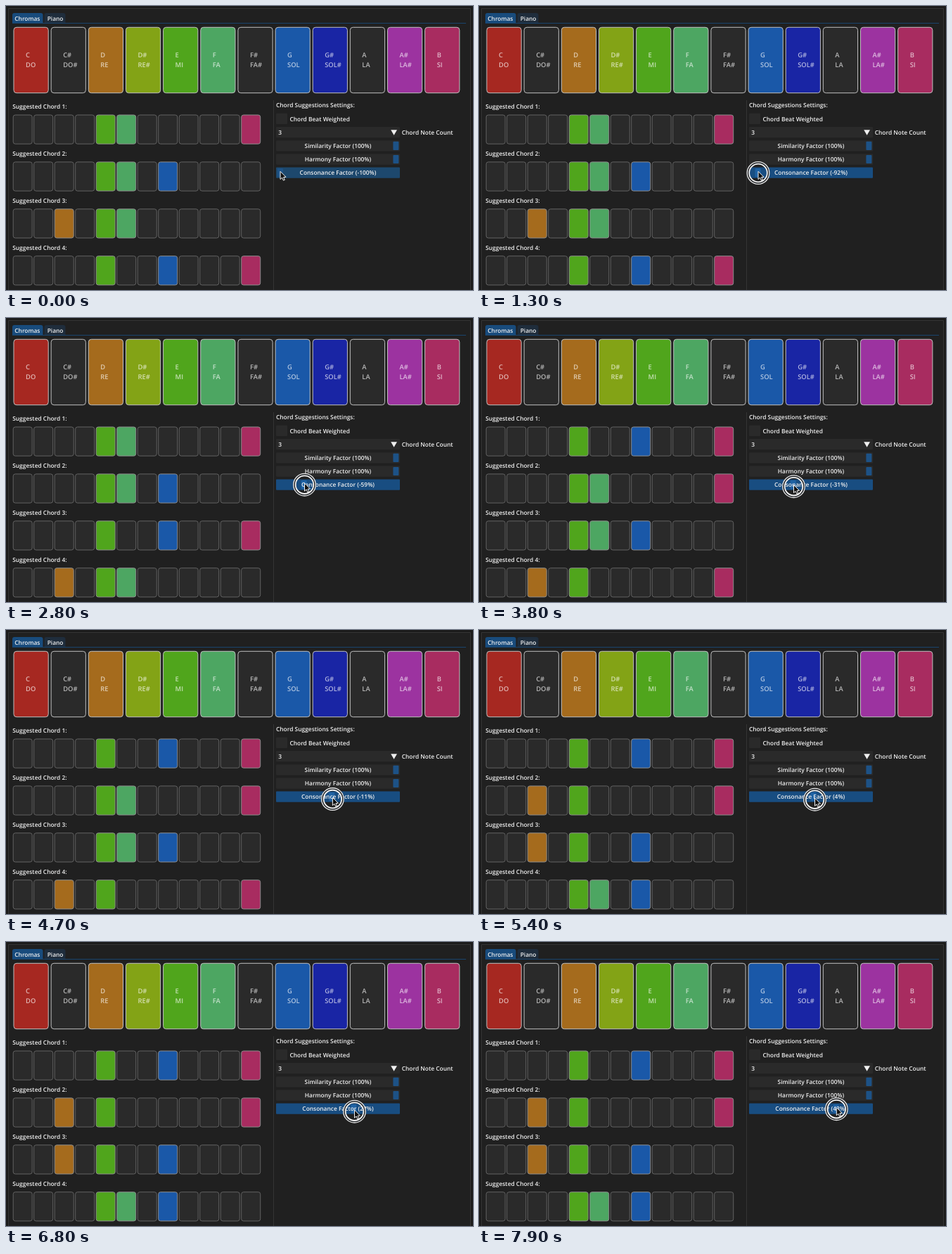
These frames come from a looping animation (664 by 404 pixels, 8000 ms). An HTML page with a canvas:

```html
<!DOCTYPE html>
<html lang="en">
<head>
<meta charset="utf-8">
<title>Chord suggestions</title>
<style>
html, body { margin: 0; width: 100%; height: 100%; overflow: hidden; background: #202020; }
canvas { display: block; width: 664px; height: 404px; }
</style>
</head>
<body>
<canvas id="stage"></canvas>
<script>
const W = 664, H = 404, LOOP = 8000, STEP = 100;
const canvas = document.getElementById('stage');
const ctx = canvas.getContext('2d');
const ratio = window.devicePixelRatio || 1;
canvas.width = W * ratio;
canvas.height = H * ratio;

const DARK = '#2a2a2a', INK = '#f0f0f0';
const FAMILY = '"Open Sans", "Noto Sans", sans-serif';
const NOTES = ['C', 'C#', 'D', 'D#', 'E', 'F', 'F#', 'G', 'G#', 'A', 'A#', 'B'];
const SOLFA = ['DO', 'DO#', 'RE', 'RE#', 'MI', 'FA', 'FA#', 'SOL', 'SOL#', 'LA', 'LA#', 'SI'];
const COLORS = {
  C: '#a62821', D: '#a56b1d', 'D#': '#83a316', E: '#50a51c', F: '#4da662',
  G: '#1a58a8', 'G#': '#1925a4', 'A#': '#9c33a0', B: '#a82c60'
};

// Ranked chords from each moment on
const RANKS = [
  [0, 'EFB EFG DEF EGB'],
  [2000, 'EFB EFG EGB DEF'],
  [3100, 'EFB EGB EFG DEF'],
  [3300, 'EGB EFB EFG DEF'],
  [3500, 'EGB EFB EFG DEB'],
  [5000, 'EGB EFB DEB EFG'],
  [5200, 'EGB DEB DEG EFG']
].map(([at, list]) => ({ at, chords: list.split(' ') }));

// time, pointer x, pointer y, slider value
const PATH = [
  [0, 390, 235.3, -100],
  [400, 390, 235.3, -100],
  [1300, 397, 235.3, -92],
  [2800, 424.5, 235, -59],
  [3800, 447.5, 237.5, -31],
  [5400, 477.5, 239, 4],
  [6800, 495.5, 239, 27],
  [7900, 508.3, 235.5, 43]
];
const PRESS = 200;

function pose(t) {
  let i = 1;
  while (i < PATH.length - 1 && t > PATH[i][0]) i++;
  const a = PATH[i - 1], b = PATH[i];
  const k = Math.min(1, (t - a[0]) / (b[0] - a[0]));
  const [x, y, value] = [1, 2, 3].map(n => a[n] + (b[n] - a[n]) * k);
  return { x, y, value: Math.round(value) };
}

function box(x, y, w, h, r, fill, stroke) {
  ctx.beginPath();
  ctx.roundRect(x, y, w, h, r);
  if (fill) {
    ctx.fillStyle = fill;
    ctx.fill();
  }
  if (stroke) {
    ctx.strokeStyle = stroke;
    ctx.lineWidth = 1;
    ctx.stroke();
  }
}

function label(str, x, y, { size = 8.4, color = INK, align = 'left' } = {}) {
  ctx.font = `600 ${size}px ${FAMILY}`;
  ctx.textRendering = 'geometricPrecision';
  ctx.textAlign = align;
  ctx.fillStyle = color;
  ctx.fillText(str, x, y);
}

function circle(x, y, r, width, color) {
  ctx.beginPath();
  ctx.arc(x, y, r, 0, Math.PI * 2);
  ctx.lineWidth = width;
  ctx.strokeStyle = color;
  ctx.stroke();
}

function drawWindow() {
  ctx.fillStyle = '#1b1b1b';
  ctx.fillRect(0, 0, W, H);
  box(3.5, 3.5, 657, 420, 0, '#202020', '#353535');
  box(9, 10, 43.5, 14.5, [3, 3, 0, 0], '#184b7c');
  box(54.5, 10, 30, 14.5, [3, 3, 0, 0], '#1f2d3c');
  ctx.fillStyle = '#19446d';
  ctx.fillRect(9, 24, 645, 1);
  label('Chromas', 12.3, 20.8);
  label('Piano', 58.7, 20.8);
  ctx.fillStyle = '#343434';
  ctx.fillRect(380, 134, 1, 270);
}

function drawKeys() {
  NOTES.forEach((note, i) => {
    const x = 11 + i * 53.15;
    box(x, 30.3, 49.2, 93.4, 4, COLORS[note] || DARK, '#c0c0c0');
    const style = { size: 9.4, color: 'rgba(255,255,255,0.66)' };
    label(note, x + 17, 73.3, style);
    label(SOLFA[i], x + 17, 86.6, style);
  });
}

function drawChords(t) {
  const { chords } = RANKS.filter(rank => rank.at <= t).pop();
  chords.forEach((chord, row) => {
    const y = 155 + row * 66.9;
    label(`Suggested Chord ${row + 1}:`, 9.2, y - 9);
    NOTES.forEach((note, i) => {
      const on = chord.includes(note);
      box(10.2 + i * 29.5, y, 27, 41.2, 3, on ? COLORS[note] : DARK, on ? '#8c8c8c' : '#626262');
    });
  });
}

function drawSlider(name, value, y, fill, grab) {
  box(384, y, 176, 15.3, 1, fill);
  box(386 + (value + 100) * 0.822, y + 1.6, 8, 12.1, 1, grab);
  label(`${name} Factor (${value}%)`, 472, y + 10.8, { align: 'center' });
}

function drawSettings(value, pressed) {
  label('Chord Suggestions Settings:', 384, 144.4);
  box(384, 152.8, 16, 15.3, 1, DARK);
  label('Chord Beat Weighted', 403.4, 163.5);
  box(384, 172, 176, 15.3, 1, DARK);
  label('3', 387.3, 182.8);
  ctx.beginPath();
  ctx.moveTo(547.2, 176.2);
  ctx.lineTo(556, 176.2);
  ctx.lineTo(551.6, 183.8);
  ctx.fillStyle = INK;
  ctx.fill();
  label('Chord Note Count', 562.7, 182.8);
  drawSlider('Similarity', 100, 191.2, DARK, '#1d5286');
  drawSlider('Harmony', 100, 210.4, DARK, '#1d5286');
  drawSlider('Consonance', value, 229.5, pressed ? '#184d81' : '#1d486d', pressed ? '#1f62a3' : '#1d5286');
}

function drawPointer(x, y, pressed) {
  if (pressed) {
    const cy = y + 2.2;
    circle(x, cy, 14.3, 4, '#202327');
    circle(x, cy, 15.8, 1.3, '#e8e8e8');
    circle(x, cy, 12.8, 1.8, '#f2f2f2');
  }
  const outline = [[0, 0], [0, 11.2], [2.6, 8.9], [4.4, 12.8], [6.3, 12], [4.6, 8.2], [8, 8]];
  ctx.beginPath();
  outline.forEach(([dx, dy]) => ctx.lineTo(x + dx, y + dy));
  ctx.closePath();
  ctx.fillStyle = '#101010';
  ctx.fill();
  ctx.lineWidth = 1;
  ctx.lineJoin = 'round';
  ctx.strokeStyle = '#f4f4f4';
  ctx.stroke();
}

function draw(now) {
  const t = Math.floor((now % LOOP) / STEP) * STEP;
  const { x, y, value } = pose(t);
  const pressed = t >= PRESS;
  ctx.setTransform(ratio, 0, 0, ratio, 0, 0);
  drawWindow();
  drawKeys();
  drawChords(t);
  drawSettings(value, pressed);
  drawPointer(x, y, pressed);
}

let start;
function tick(now) {
  start ??= now;
  draw(now - start);
  requestAnimationFrame(tick);
}
draw(0);
requestAnimationFrame(tick);
</script>
</body>
</html>
```
